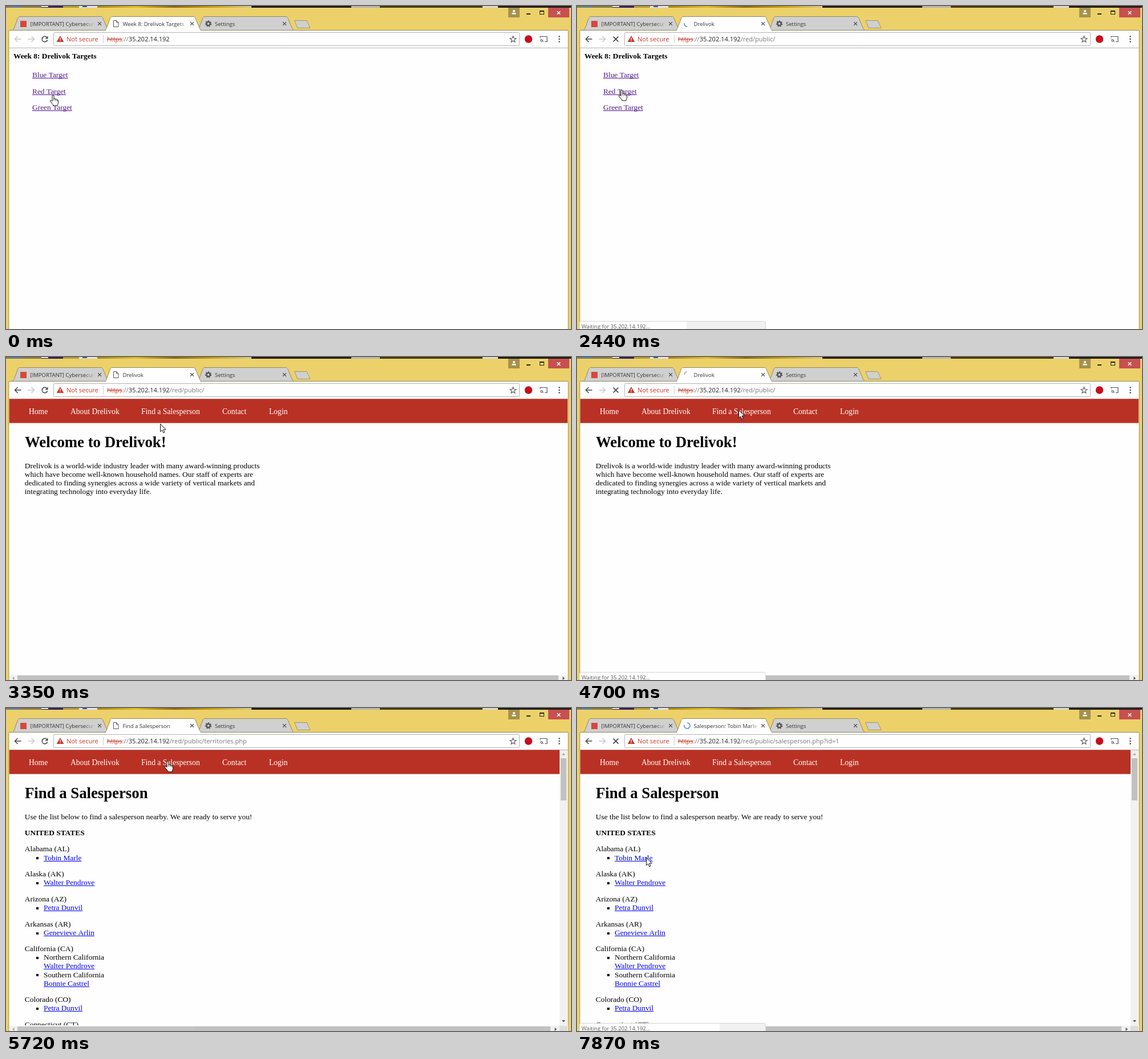
These frames come from a looping animation (990x566 px, 8 s). An HTML page with a canvas:

```html
<!DOCTYPE html>
<html lang="en">
<head>
<meta charset="utf-8">
<title>Browser session</title>
<style>
html, body { margin: 0; width: 100%; height: 100%; overflow: hidden; background: #fefefe; }
canvas { display: block; }
</style>
</head>
<body>
<canvas id="stage" width="990" height="566"></canvas>
<script>
const ctx = document.getElementById('stage').getContext('2d');
const LOOP = 8000, TAU = Math.PI * 2;
const UI = '"Open Sans", "Noto Sans", sans-serif';
const SERIF = '"Liberation Serif", serif';
const BODY = `13.4px ${SERIF}`, BOLD = `bold 13.4px ${SERIF}`, HEAD = `bold 26.75px ${SERIF}`;
const NAV = `13.6px ${SERIF}`, SMALL = `9.5px ${UI}`, ADDRESS = `11.05px ${UI}`;
const PAPER = '#fefefe', GOLD = '#ecd16b', RED = '#b93124', LINK = '#0000ee', VISITED = '#551a8b';
const HOST = '35.202.14.192', COMPANY = 'Drelivok', SELLER = 'Tobin Marle';

const BURSTS = [[280, 750, 4], [1200, 2140, 8], [2280, 2580, 3], [2890, 3910, 8],
  [4430, 5400, 8], [5540, 6550, 8], [6690, 6980, 3], [7280, 7870, 5]];
const LOADS = [
  { start: 1200, commit: 2140, end: 2580, ref: 2430, sweep: 1.8 },
  { start: 4430, commit: 5261, end: 5400, ref: 5261, sweep: 1.8 },
  { start: 7280, commit: 7722, end: LOOP, ref: 7870, sweep: 4.9 }];
// Status bubble: link address, grey tail, fade-in, click, fade-out.
const HOVERS = [
  { path: '/red/public/', tail: 192, from: 430, click: 1200, out: 2890 },
  { path: '/red/public/territories.php', tail: 331, from: 3610, click: 4430, out: 5540 },
  { path: '/red/public/salesperson.php?id=1', tail: 250, from: 6550, click: 7280, out: LOOP }];
const POINTER = [[0, 82, 156], [280, 82, 156], [590, 78, 147], [2890, 78, 147], [3327, 270, 117],
  [3618, 283, 93], [5690, 283, 93], [6550, 121, 262], [LOOP, 121, 262]];
const HAND_TIMES = [[0, 1200], [2140, 2890], [3470, 4430], [5120, 5820], [6550, 7280]];

const arrowShape = new Path2D('M0 0V13.6L3.1 10.7L5.3 15.6L7.5 14.6L5.4 9.8H9.8Z');
const handShape = new Path2D('M-1.5 10V1.6A1.5 1.5 0 0 1 1.5 1.6V6.5Q1.9 5.6 3.2 5.9Q4.3 6.2 4.4 7.3' +
  'Q5 6.4 6.2 6.9Q7 7.3 7.1 8.3Q8.8 7.8 9 9.5V13Q9 15 7.5 17V18.5H.3V17Q-3 13.5 -5 10.8Q-5.6 9.2 -4 8.9Q-2.8 9 -1.5 10.8Z');

const clamp = v => Math.max(0, Math.min(1, v));
const within = (t, a, b) => t >= a && t < b;

// Latest entry whose time has been reached.
const latest = (t, list) => list.filter(([at]) => t >= at).pop()[1];

function refreshTime(t) {
  let last = 0;
  for (const [a, b, n] of BURSTS) {
    if (t < a) break;
    const gap = (b - a) / (n - 1);
    last = Math.min(b, a + Math.floor((t - a + 8) / gap) * gap);
  }
  return last;
}

function rect(x, y, w, h, color) {
  ctx.fillStyle = color;
  ctx.fillRect(x, y, w, h);
}

function text(str, x, y, font, color = '#000') {
  ctx.font = font;
  ctx.fillStyle = color;
  ctx.fillText(str, x, y);
  return ctx.measureText(str).width;
}

function link(str, x, y, color) {
  const w = text(str, x, y, BODY, color);
  rect(x, Math.round(y) + 1, w, 1, color);
}

function line(points, color, width = 1, close = false) {
  ctx.beginPath();
  points.forEach(([x, y]) => ctx.lineTo(x, y));
  if (close) ctx.closePath();
  ctx.strokeStyle = color;
  ctx.lineWidth = width;
  ctx.stroke();
}

function polygon(points, fill, border) {
  ctx.beginPath();
  points.forEach(([x, y]) => ctx.lineTo(x, y));
  ctx.closePath();
  ctx.fillStyle = fill;
  ctx.fill();
  if (border) line(points, border, 1, true);
}

function disc(x, y, r, color) {
  ctx.beginPath();
  ctx.arc(x, y, r, 0, TAU);
  ctx.fillStyle = color;
  ctx.fill();
}

function arc(x, y, r, a, b, color, width) {
  ctx.beginPath();
  ctx.arc(x, y, r, a, b);
  ctx.strokeStyle = color;
  ctx.lineWidth = width;
  ctx.stroke();
}

function cross(x, y, r, color, width) {
  line([[x - r, y - r], [x + r, y + r]], color, width);
  line([[x - r, y + r], [x + r, y - r]], color, width);
}

function triangle(x, y, angle, color) {
  ctx.save();
  ctx.translate(x, y);
  ctx.rotate(angle);
  polygon([[-1.5, -3], [2, 0], [-1.5, 3]], color);
  ctx.restore();
}

function drawDesktopStrip() {
  rect(0, 0, 990, 3, '#231d18');
  rect(0, 0, 62, 3, '#8a7a4a');
  rect(8, 0, 18, 2, '#4d86c0');
  rect(62, 0, 12, 2, '#e8e8e8');
  rect(74, 0, 26, 3, '#30245e');
  rect(100, 0, 28, 3, '#b39b3c');
  rect(128, 0, 32, 3, '#dfe5ee');
  rect(134, 0, 8, 2, '#315a99');
  const gold = ctx.createLinearGradient(160, 0, 430, 0);
  ['#a88512', '#e0c01e', '#8a6810', '#c6a012', '#d9c98c'].forEach((c, i) => gold.addColorStop(i / 4, c));
  rect(160, 0, 270, 3, gold);
  rect(605, 0, 50, 3, '#b9b5ad');
  rect(655, 0, 180, 3, '#4a3812');
  rect(835, 0, 27, 3, '#ded9cf');
}

function drawWindow() {
  rect(0, 0, 990, 566, GOLD);
  drawDesktopStrip();
  rect(5, 43, 980, 523, PAPER);
  rect(4.4, 43, 1, 523, '#a3904b');
  rect(984.7, 43, 1, 523, '#a3904b');

  rect(880, 3, 20, 17, '#a6924c');
  disc(890, 9, 2, '#fff');
  rect(886.5, 12, 7, 2.5, '#fff');
  rect(912, 13, 7, 2, '#222');
  ctx.strokeStyle = '#222';
  ctx.lineWidth = 1;
  ctx.strokeRect(935.5, 8.5, 7, 6);
  rect(935, 8, 8, 2, '#222');
  rect(950, 3, 37, 17, '#c75050');
  cross(968.5, 12, 2.8, '#fff', 1.4);
}

function tabTitle(str, x, right) {
  const fade = ctx.createLinearGradient(right - 18, 0, right, 0);
  fade.addColorStop(0, '#333');
  fade.addColorStop(1, 'rgba(51,51,51,0)');
  text(str, x, 34.5, SMALL, fade);
}

function drawTab(x, fill) {
  polygon([[x - 1, 42.5], [x + 1.5, 40.5], [x + 9, 20.5], [x + 11, 18.5], [x + 155.5, 18.5],
    [x + 157.5, 20.5], [x + 166, 40.5], [x + 168.5, 42.5]], fill, '#94895f');
  cross(x + 152, 31, 2.9, '#4a4a4a', 1.3);
}

function drawTabs(t, load) {
  drawTab(12, '#d0d0d0');
  drawTab(336, '#d0d0d0');
  line([[5, 42.5], [985, 42.5]], '#94895f');
  drawTab(174, PAPER);
  rect(175, 42, 166, 2, PAPER);
  polygon([[505.5, 25.5], [527, 25.5], [533, 38.5], [511, 38.5]], '#d0d0d0', '#a19569');

  rect(25, 26, 11, 11, '#d5483c');
  tabTitle('[IMPORTANT] Cybersecurity', 42.5, 156);
  disc(354.5, 31, 4.4, '#555');
  ctx.setLineDash([2.1, 2.1]);
  arc(354.5, 31, 4.7, 0, TAU, '#555', 2);
  ctx.setLineDash([]);
  disc(354.5, 31, 1.9, '#d0d0d0');
  tabTitle('Settings', 366, 480);

  if (load) drawSpinner(t, load);
  else {
    polygon([[188.5, 25.5], [193.5, 25.5], [197, 29], [197, 36.5], [188.5, 36.5]], '#fff', '#555');
    line([[193.5, 25.5], [193.5, 29], [197, 29]], '#555');
  }
  tabTitle(latest(t, [[0, `Week 8: ${COMPANY} Targets`], [2280, COMPANY],
    [5261, 'Find a Salesperson'], [7860, `Salesperson: ${SELLER}`]]), 204.5, 320);
}

function drawSpinner(t, { start, commit, ref, sweep }) {
  if (t < commit) {
    const end = Math.PI * 1.5 - (t - start - 270) / 1320 * TAU;
    arc(193, 31, 5, end - Math.PI / 2, end, '#a0a0a0', 1.5);
  } else {
    const end = 3.35 + (t - ref) / 1568 * TAU;
    arc(193, 31, 5, end - sweep, end, '#4d8bf0', 1.6);
  }
}

function drawArrowIcon(x, dir, color) {
  line([[x - 5.5, 58], [x + 5.5, 58]], color, 1.5);
  line([[x + dir * .5, 53], [x + dir * 5.5, 58], [x + dir * .5, 63]], color, 1.5);
}

function drawToolbar(t, load) {
  drawArrowIcon(21, -1, t < 2140 ? '#c8c8c8' : '#444');
  drawArrowIcon(44, 1, '#c8c8c8');
  if (load) cross(68, 58, 4.4, '#444', 1.6);
  else {
    arc(68, 58, 4.8, .35, TAU - .8, '#444', 1.6);
    polygon([[73.5, 52.5], [73.5, 57.5], [68.5, 57.5]], '#444');
  }

  ctx.beginPath();
  ctx.roundRect(83.5, 46.5, 816, 23, 2);
  ctx.fillStyle = '#fff';
  ctx.fill();
  ctx.strokeStyle = '#b4b4b4';
  ctx.lineWidth = 1;
  ctx.stroke();

  polygon([[95, 52], [101.3, 63], [88.7, 63]], '#c53929');
  rect(94.4, 55.5, 1.3, 3.8, '#fff');
  rect(94.4, 60.3, 1.3, 1.3, '#fff');
  text('Not secure', 106, 62, ADDRESS, '#c53929');
  rect(170, 51, 1, 14, '#cfcfcf');
  let x = 177;
  const scheme = text('https', x, 62, ADDRESS, '#c53929');
  rect(x, 58, scheme, 1, '#c53929');
  x += scheme;
  x += text('://', x, 62, ADDRESS, '#777');
  x += text(HOST, x, 62, ADDRESS, '#222');
  text(latest(t, [[0, ''], [2140, '/red/public/'], [5261, '/red/public/territories.php'],
    [7722, '/red/public/salesperson.php?id=1']]), x, 62, ADDRESS, '#777');

  const star = Array.from({ length: 10 }, (_, i) => {
    const a = i * TAU / 10 - TAU / 4, r = i % 2 ? 2.5 : 5.8;
    return [888.5 + r * Math.cos(a), 58.5 + r * Math.sin(a)];
  });
  line(star, '#555', 1.1, true);
  disc(915.5, 58, 6.7, '#c70d1e');
  line([[936, 55.5], [936, 53.5], [948, 53.5], [948, 62.5], [944, 62.5]], '#555', 1.2);
  arc(936, 63, 2.5, -Math.PI / 2, 0, '#555', 1.2);
  arc(936, 63, 5, -Math.PI / 2, 0, '#555', 1.2);
  [53.5, 58, 62.5].forEach(y => disc(969.5, y, 1.3, '#444'));
  rect(5, 73, 980, 1, '#b6b6b6');
}

function drawTargets() {
  text(`Week 8: ${COMPANY} Targets`, 13, 92, BOLD);
  ['Blue', 'Red', 'Green'].forEach((name, i) => link(`${name} Target`, 46, 125 + i * 28.5, VISITED));
}

function drawNav(right) {
  rect(5.7, 73.5, right - 5.7, 42.2, RED);
  [['Home', 40], [`About ${COMPANY}`, 113], ['Find a Salesperson', 237], ['Contact', 379], ['Login', 461]]
    .forEach(([label, x]) => text(label, x, 100, NAV, '#fff'));
}

function drawBottomScroll(right) {
  rect(6, 557, right - 6, 9, '#f1f1f1');
  rect(20, 558, right - 36, 8, '#c1c1c1');
  triangle(13, 563, Math.PI, '#a3a3a3');
  triangle(right - 7, 563, 0, '#505050');
}

function drawWelcome() {
  drawNav(984);
  text(`Welcome to ${COMPANY}!`, 33, 158, HEAD);
  [`${COMPANY} is a world-wide industry leader with many award-winning products`,
    'which have become well-known household names. Our staff of experts are',
    'dedicated to finding synergies across a wide variety of vertical markets and',
    'integrating technology into everyday life.']
    .forEach((row, i) => text(row, 32.8, 194.6 + i * 15.1, BODY));
  drawBottomScroll(984);
}

function drawTerritories() {
  drawNav(970);
  text('Find a Salesperson', 33, 158, HEAD);
  text('Use the list below to find a salesperson nearby. We are ready to serve you!', 32.8, 194.6, BODY);
  text('UNITED STATES', 32.8, 222.8, BOLD);
  const states = [
    ['Alabama (AL)', SELLER], ['Alaska (AK)', 'Walter Pendrove'], ['Arizona (AZ)', 'Petra Dunvil'],
    ['Arkansas (AR)', 'Genevieve Arlin'],
    ['California (CA)', 'Northern California:Walter Pendrove', 'Southern California:Bonnie Castrel'],
    ['Colorado (CO)', 'Petra Dunvil'], ['Connecticut (CT)']];
  let y = 251.4;
  for (const [state, ...entries] of states) {
    text(state, 32.8, Math.round(y), BODY);
    for (const entry of entries) {
      const parts = entry.split(':');
      rect(53, Math.round(y) + 10, 4, 4, '#000');
      parts.forEach((part, i) => {
        y += 15.1;
        if (i === parts.length - 1) link(part, 66, Math.round(y), LINK);
        else text(part, 66, Math.round(y), BODY);
      });
    }
    y += 28.6;
  }
  rect(6, 556, 979, 10, PAPER);
  drawBottomScroll(970);
  rect(970, 74, 14, 483, '#f1f1f1');
  rect(972, 88, 10, 74, '#c1c1c1');
  triangle(977, 81, -Math.PI / 2, '#a3a3a3');
  triangle(977, 548.5, Math.PI / 2, '#505050');
  rect(970, 557, 14, 9, '#dcdcdc');
}

function drawStatus(t) {
  const hover = HOVERS.find(h => within(t, h.from, h.out + 150));
  if (!hover) return;
  const { path, tail, from, click, out } = hover;
  ctx.globalAlpha = Math.min(clamp((t - from) / 290), clamp((out + 150 - t) / 150));
  ctx.beginPath();
  ctx.roundRect(4.5, 552.5, 326, 20, 3);
  ctx.fillStyle = PAPER;
  ctx.fill();
  rect(tail, 553, 331 - tail, 13, '#f1f1f1');
  ctx.strokeStyle = '#d4d4d4';
  ctx.lineWidth = 1;
  ctx.stroke();
  text(t < click ? `https://${HOST}${path}` : `Waiting for ${HOST}...`, 8, 565, SMALL, '#555');
  ctx.globalAlpha = 1;
}

function drawPointer(t) {
  const i = Math.max(1, POINTER.findIndex(([at]) => at > t));
  const [t0, x0, y0] = POINTER[i - 1], [t1, x1, y1] = POINTER[i];
  const k = (t - t0) / (t1 - t0);
  const shape = HAND_TIMES.some(([a, b]) => within(t, a, b)) ? handShape : arrowShape;
  ctx.save();
  ctx.translate(x0 + (x1 - x0) * k + .5, y0 + (y1 - y0) * k + .3);
  ctx.fillStyle = '#fff';
  ctx.fill(shape);
  ctx.strokeStyle = '#111';
  ctx.lineWidth = 1;
  ctx.stroke(shape);
  if (shape === handShape) {
    line([[1.5, 6], [1.5, 9.5]], '#111', .8);
    line([[4.4, 7], [4.4, 10]], '#111', .8);
    line([[7.1, 8], [7.1, 10.5]], '#111', .8);
  }
  ctx.restore();
}

function draw() {
  const t = refreshTime(performance.now() % LOOP);
  const load = LOADS.find(l => within(t, l.start, l.end));
  drawWindow();
  drawTabs(t, load);
  drawToolbar(t, load);
  latest(t, [[0, drawTargets], [2580, drawWelcome], [5400, drawTerritories]])();
  drawStatus(t);
  drawPointer(t);
  requestAnimationFrame(draw);
}
draw();
</script>
</body>
</html>
```
